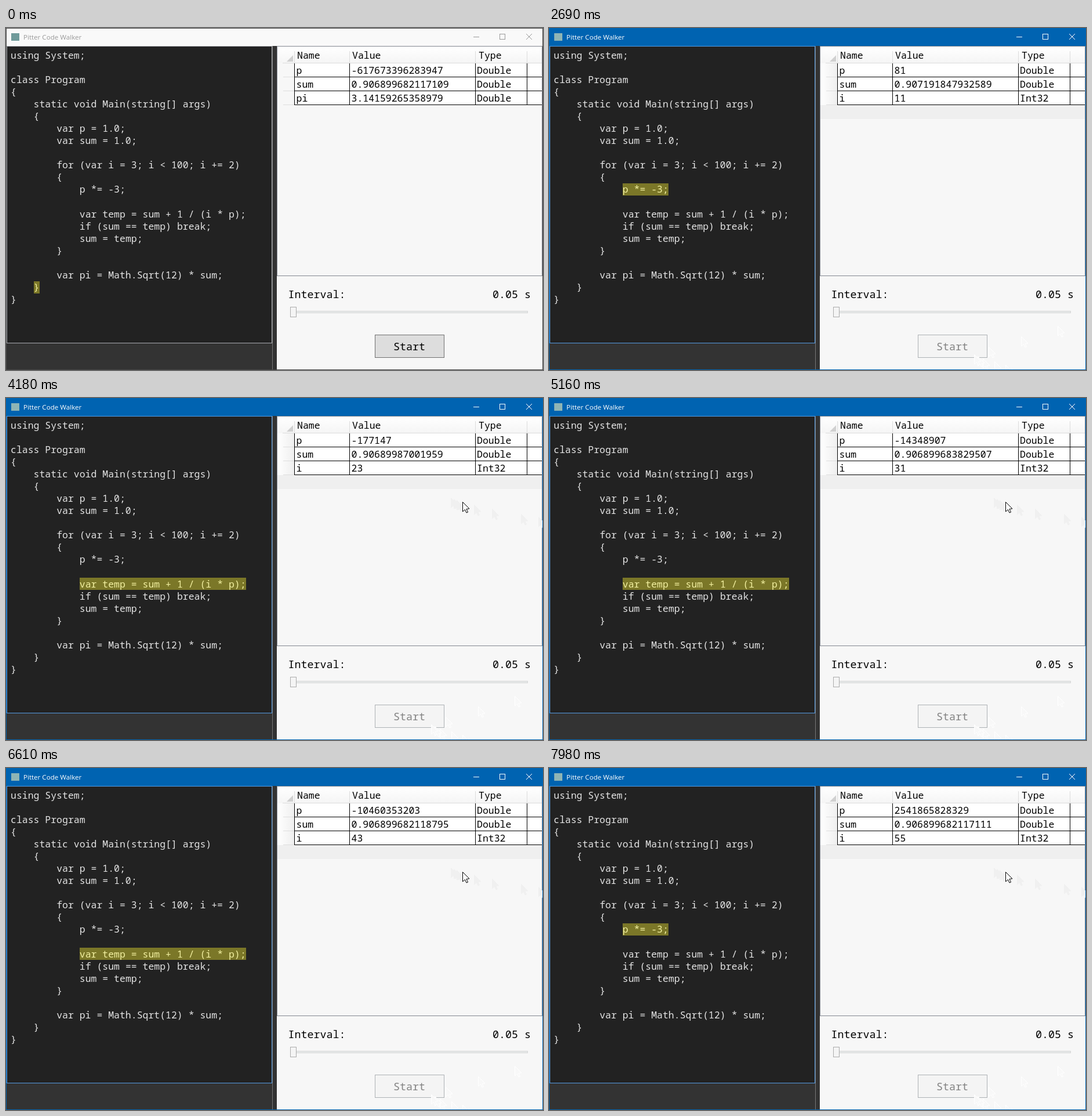
Recreate the animation shown at these times as an HTML page with a canvas. Size 926 px wide and 590 px high, loop 8 s.

```html
<!DOCTYPE html>
<html lang="en">
<head>
<meta charset="utf-8">
<title>Pitter Code Walker</title>
<style>
html, body { margin: 0; width: 100%; height: 100%; overflow: hidden; background: #f7f7f7; }
canvas { display: block; }
</style>
</head>
<body>
<canvas id="stage" width="926" height="590"></canvas>
<script>
const g = document.getElementById('stage').getContext('2d');
const LOOP = 8000, PRESS = 1320, RELEASE = 1400, RUN = 1590;
const MONO = '"Noto Sans Mono", monospace', CHAR = 9.896, LINE = 21.07;

const code = `using System;

class Program
{
    static void Main(string[] args)
    {
        var p = 1.0;
        var sum = 1.0;

        for (var i = 3; i < 100; i += 2)
        {
            p *= -3;

            var temp = sum + 1 / (i * p);
            if (sum == temp) break;
            sum = temp;
        }

        var pi = Math.Sqrt(12) * sum;
    }
}`.split('\n');

// [time, step number] pairs; steps run evenly in between
const pace = [[RUN, 0], [1760, 3], [2690, 23], [2770, 24], [4180, 54], [4270, 55], [5160, 74],
  [5200, 75], [6610, 104], [6660, 105], [7980, 133], [8030, 134]];

// [time, x, y] of the pointer; no place means outside the window
const path = [[820, 797, 586], [870, 787, 581], [910, 768, 575], [950, 748, 570], [1000, 739, 566],
  [1040, 733, 563], [1960, 758, 550], [2000, 814, 532], [2040, 877, 514], [2090],
  [2800, 918, 205], [2840, 888, 200], [2890, 838, 191], [2930, 807, 184], [2970, 777, 176],
  [3010, 772, 174], [3050, 767, 172], [3100, 787, 179]];

const rect = (x, y, w, h, fill) => { g.fillStyle = fill; g.fillRect(x, y, w, h); };
const box = (x, y, w, h, fill, edge) => { rect(x, y, w, h, edge); rect(x + 1, y + 1, w - 2, h - 2, fill); };

function text(s, x, y, color = '#000', size = 16.494, family = MONO, align = 'left') {
  g.font = `${size}px ${family}`;
  g.textAlign = align;
  g.fillStyle = color;
  g.fillText(s, x, y);
}

function lines(color, ...runs) {
  g.strokeStyle = color;
  g.lineWidth = 1;
  g.beginPath();
  for (const [x1, y1, x2, y2] of runs) { g.moveTo(x1, y1); g.lineTo(x2, y2); }
  g.stroke();
}

function arrow(x, y, fill, edge) {
  const p = [0, 0, 0, 16.5, 4, 13, 6.5, 18.5, 9, 17.5, 6.5, 12, 11.5, 11.5];
  g.beginPath();
  for (let k = 0; k < p.length; k += 2) g.lineTo(x + .5 + p[k], y + .5 + p[k + 1]);
  g.closePath();
  g.fillStyle = fill;
  g.fill();
  g.strokeStyle = edge;
  g.lineWidth = 1;
  g.stroke();
}

function stepAt(t) {
  const k = pace.findIndex(a => a[0] > t);
  const [t0, n0] = pace[k - 1], [t1, n1] = pace[k];
  return Math.floor(n0 + (n1 - n0) * (t - t0) / (t1 - t0) + 1e-6);
}

const show = v => String(Number(v.toPrecision(15)));

// Highlighted line and visible variables at time t
function debug(t) {
  if (t < RUN) return { line: 19, rows: [['p', '-617673396283947'], ['sum', '0.906899682117109'], ['pi', '3.14159265358979']] };
  const n = stepAt(t);
  if (n < 3) return { line: [6, 7, 9][n], rows: [['p', '1'], ['sum', '1']].slice(0, n) };
  const turn = Math.floor((n - 3) / 5), part = (n - 3) % 5;
  let p = 1, sum = 1, i = 3;
  for (let k = 0; k < turn; k++, i += 2) { p *= -3; sum += 1 / (i * p); }
  if (part > 0) p *= -3;
  const temp = sum + 1 / (i * p);
  if (part > 3) sum = temp;
  const rows = [['p', show(p)], ['sum', show(sum)], ['i', show(i), 'Int32']];
  if (part > 1) rows.push(['temp', show(temp)]);
  return { line: [11, 13, 14, 15, 16][part], rows };
}

function titleBar(active) {
  const ink = active ? '#fff' : '#999';
  rect(0, 0, 926, 590, active ? '#0063b1' : '#444');
  rect(1, 1, 924, 30, active ? '#0063b1' : '#f9f9f9');
  rect(9, 9, 14, 13, active ? '#8fb5b5' : '#6f9a9a');
  text('Pitter Code Walker', 30, 20, ink, 11.6, '"Open Sans", sans-serif');
  lines(ink, [806, 15.5, 816, 15.5], [897, 10, 907, 20], [907, 10, 897, 20]);
  g.strokeRect(851.5, 10.5, 9, 9);
}

function editor(active, current) {
  rect(1, 31, 466, 558, '#333');
  rect(459, 31, 1, 558, '#777');
  box(1, 31, 458, 513, '#222', active ? '#569de5' : '#abadb3');
  code.forEach((s, k) => {
    const top = 36.4 + LINE * k, body = s.trimStart(), x = 8 + (s.length - body.length) * CHAR;
    if (k === current) rect(Math.round(x), Math.round(top), Math.round(body.length * CHAR), 21, '#7b7728');
    text(body, x, Math.round(top + 16.2), k === current ? '#f2f0a0' : '#e4e4e4');
  });
}

function grid(rows, running) {
  box(467, 31, 458, 397, '#f7f7f7', '#828790');
  const shade = g.createLinearGradient(0, 32, 0, 60);
  shade.addColorStop(0, '#fff');
  shade.addColorStop(1, '#f5f5f5');
  rect(468, 32, 456, 28, shade);
  lines('#dcdcdc', [477, 60.5, 924, 60.5], ...[497, 592, 809, 898].map(x => [x + .5, 40, x + .5, 60]));
  g.fillStyle = '#d0d0d0';
  g.beginPath();
  g.moveTo(495, 47); g.lineTo(495, 58); g.lineTo(484, 58);
  g.fill();
  text('Name', 502, 53);
  text('Value', 597, 53);
  text('Type', 815, 53);

  rows.forEach(([name, value, type = 'Double'], k) => {
    const y = 61 + 24 * k;
    if (running) {
      const side = g.createLinearGradient(468, 0, 497, 0);
      side.addColorStop(0, '#fff');
      side.addColorStop(1, '#efefef');
      rect(468, y, 29, 24, side);
    }
    rect(497, y, 427, 24, '#fff');
    lines('#dedede', [478, y + 23.5, 497, y + 23.5]);
    lines('#000', [497, y + 23.5, 924, y + 23.5], ...[497, 592, 809, 898].map(x => [x + .5, y, x + .5, y + 24]));
    text(name, 500.5, y + 18);
    text(value, 595.5, y + 18);
    text(type, 812, y + 18);
  });
  if (running) rect(468, 61 + 24 * rows.length, 456, 24, '#efefef');
}

function controls(t) {
  rect(467, 428, 458, 161, '#f7f7f7');
  text('Interval:', 486.5, 466, '#000', 18.33);
  text('0.05 s', 905, 466, '#000', 18.33, MONO, 'right');
  box(490, 488, 410, 4, '#e7eaea', '#d6d6d6');
  box(490, 481, 11, 18, '#f4f4f4', '#acacac');
  const [fill, edge, ink] =
    t < 1000 ? ['#ddd', '#707070', '#000'] :
    t < PRESS ? ['#bee6fd', '#3c7fb1', '#000'] :
    t < RELEASE ? ['#c4e5f6', '#2c628b', '#000'] : ['#f4f4f4', '#adb2b5', '#838383'];
  box(636, 529, 120, 40, fill, edge);
  text('Start', 695.5, 556, ink, 18.33, MONO, 'center');
}

function pointer(t) {
  const past = path.filter(a => a[0] <= t), now = past.pop();
  g.save();
  g.beginPath();
  g.rect(468, 32, 457, 557);
  g.clip();
  for (const [, x, y] of past) {
    // Faint trail left behind on the panels
    if (x && y < 300) arrow(x, y, '#f0f0f0', '#f0f0f0');
    else if (x) arrow(x, y, '#f8f8f8', '#fff');
  }
  if (now && now.length > 1) arrow(now[1], now[2], '#fff', '#000');
  g.restore();
}

function draw(t) {
  const { line, rows } = debug(t), active = t >= PRESS;
  titleBar(active);
  editor(active, line);
  grid(rows, t >= RUN);
  controls(t);
  pointer(t);
}

const start = performance.now();
function tick() {
  draw((performance.now() - start) % LOOP);
  requestAnimationFrame(tick);
}
tick();
</script>
</body>
</html>
```
